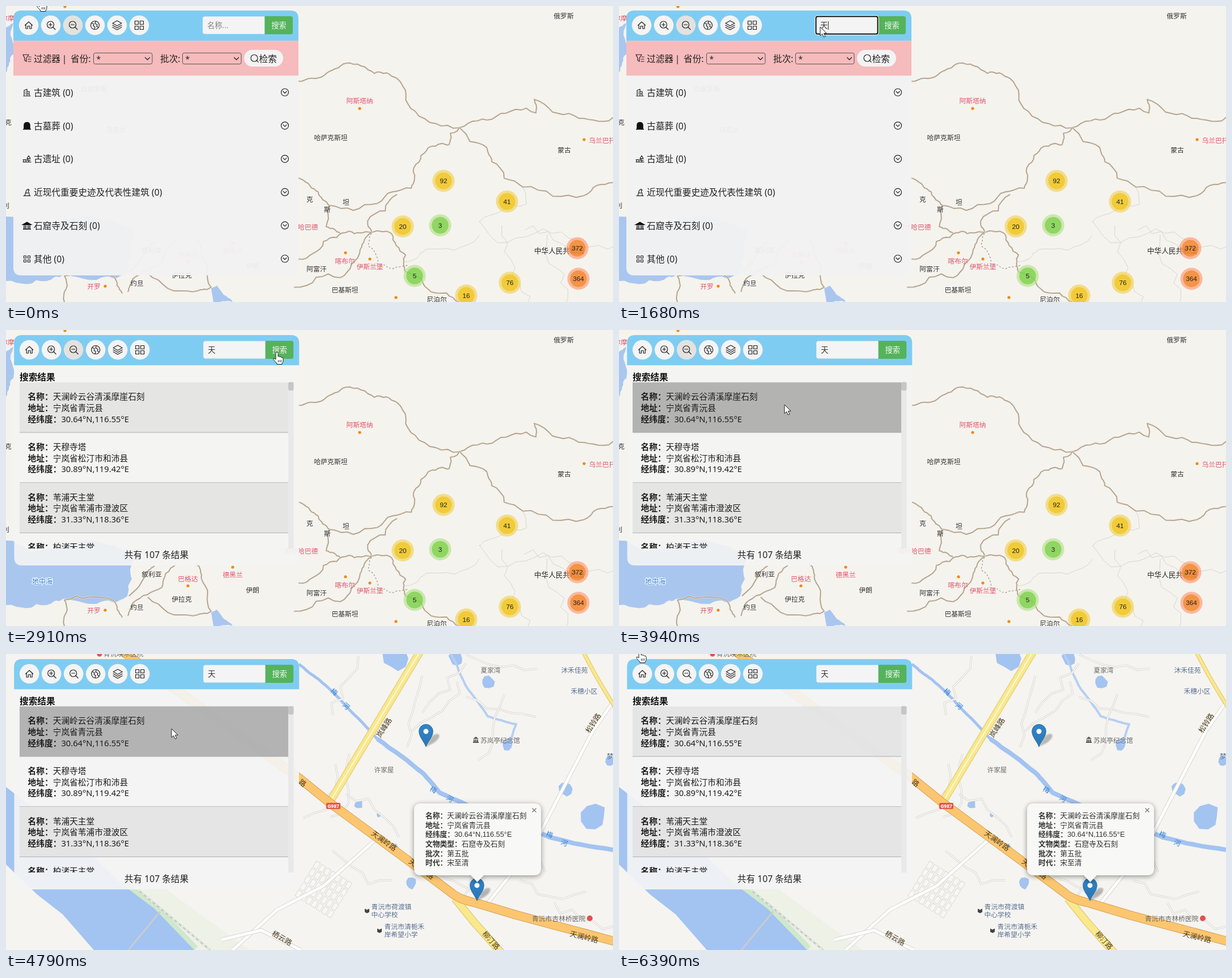
Recreate the animation shown at these times as an HTML page. Size 1071x523 px, loop 6.59 s.

```html
<!DOCTYPE html>
<html lang="zh-CN">
<head>
<meta charset="utf-8">
<title>Map search</title>
<style>
html,body{margin:0;width:100%;height:100%;overflow:hidden;background:#ddd}
svg{display:block;width:1071px;height:523px;font-family:"Noto Sans","Noto Sans CJK SC","Noto Sans CJK JP",sans-serif}
.arial{font-family:"Liberation Sans","Noto Sans CJK SC","Noto Sans CJK JP",sans-serif}
.line{fill:none;stroke:#222;stroke-width:1.2;stroke-linecap:round;stroke-linejoin:round}
.solid{fill:#111;stroke:#111;stroke-width:1.6}
</style>
</head>
<body>
<svg id="stage" viewBox="0 0 1071 523"></svg>
<script>
const LOOP = 6590;
let seed = 7;
const rnd = (a = 0, b = 1) => a + (b - a) * ((seed = seed * 16807 % 2147483647) / 2147483647);
const times = (n, fn) => Array.from({ length: n }, (_, i) => fn(i)).join('');
const each = (list, fn) => list.map(fn).join('');

// Markup helpers
const text = (x, y, s, size, fill = '#222', extra = '') =>
  `<text x="${x}" y="${(+y + size * .36).toFixed(1)}" font-size="${size}" fill="${fill}" ${extra}>${s}</text>`;
const mid = (x, y, s, size, fill, extra = '') => text(x, y, s, size, fill, 'text-anchor="middle" ' + extra);
const bold = 'font-weight="700"';
const turned = (x, y, angle, s, size, fill) =>
  `<g transform="translate(${x} ${y}) rotate(${angle})">${mid(0, 0, s, size, fill)}</g>`;
const rect = (x, y, w, h, fill, r = 0, extra = '') =>
  `<rect x="${x}" y="${y}" width="${w}" height="${h}" rx="${r}" fill="${fill}" ${extra}/>`;
const disc = (x, y, r, fill, extra = '') => `<circle cx="${x}" cy="${y}" r="${r}" fill="${fill}" ${extra}/>`;
const path = (d, fill, extra = '') => `<path d="${d}" fill="${fill}" ${extra}/>`;
const stroke = (d, color, w, extra = '') => path(d, 'none', `stroke="${color}" stroke-width="${w}" stroke-linejoin="round" ${extra}`);
const icon = (x, y, d, kind = 'line') => `<path class="${kind}" transform="translate(${x} ${y})" d="${d}"/>`;
const group = (id, body) => `<g id="${id}">${body}</g>`;
const ring = (r, x = 0, y = 0) => `M${x + r} ${y}a${r} ${r} 0 1 1 ${-2 * r} 0a${r} ${r} 0 1 1 ${2 * r} 0`;
const box = (x, y, s) => `M${x} ${y}h${s}v${s}h${-s}z`;
const tiles = s => each([-s - 1.5, 1.5], x => each([-s - 1.5, 1.5], y => box(x, y, s)));

// Adds small natural wiggles to a coarse outline
function rough(points, amount = .3, depth = 3) {
  let p = points.split(' ').map(q => q.split(',').map(Number));
  for (let k = 0; k < depth; k++) {
    const out = [p[0]];
    for (let i = 1; i < p.length; i++) {
      const [a, b] = p[i - 1], [c, d] = p[i], o = rnd(-.5, .5) * amount;
      out.push([(a + c) / 2 + (d - b) * o, (b + d) / 2 - (c - a) * o], [c, d]);
    }
    p = out;
  }
  return 'M' + p.map(q => q.map(v => v.toFixed(1))).join('L');
}

// A wandering line across a region
function wander(x, y, angle, step, n) {
  let d = `M${x} ${y}`;
  for (let i = 0; i < n; i++) {
    const a = angle + rnd(-.8, .8);
    d += `l${(Math.cos(a) * step).toFixed(1)} ${(Math.sin(a) * step).toFixed(1)}`;
  }
  return d;
}

// An uneven rounded shape
const blob = (x, y, r) => 'M' + Array.from({ length: 9 }, (_, i) => {
  const a = i * Math.PI / 4.5, k = r * rnd(.75, 1.15);
  return [(x + k * Math.cos(a)).toFixed(1), (y + k * Math.sin(a)).toFixed(1)];
}).join('L') + 'Z';

// "x y name|x y name"
const labels = (list, fn) => each(list.split('|'), s => fn(...s.split(' ')));

function worldMap() {
  const water = ['0,372 90,385 225,395 222,440 214,470 160,484 100,475 72,486 0,486', '362,499 372,494 400,523 366,523', '0,38 13,30 13,85 0,118'];
  const borders = [
    '516,133 562,122 600,101 650,119 690,128 722,186 800,215',
    '800,215 865,195 935,189 932,165 1003,194 1071,197',
    '800,215 848,250 857,275 912,320 1020,335 1071,312',
    '800,215 784,225 782,245 750,248 720,285 715,322 655,349 570,352',
    '516,304 540,322 556,338 570,352 565,390 590,402',
    '690,333 638,380 645,400 680,402 705,440 705,470 750,505 800,523',
    '516,447 560,416 605,398 645,400 625,430 590,480 508,497',
    '103,523 103,477 190,478 205,508', '217,470 246,430 262,417',
    '215,505 224,482 275,455 300,412', '250,472 330,505 362,497 345,440 335,412'];
  const border = stroke;
  const cluster = (x, y, n) => {
    const [outer, inner] = n < 10 ? ['#b5e28c', '#6ecc39'] : n < 100 ? ['#f1d357', '#f0c20c'] : ['#fd9c73', '#f18017'];
    return disc(x, y, 19.6, outer, 'opacity=".65"') + disc(x, y, 14.7, inner, 'opacity=".65"') + mid(x, y, n, 11.8, '#222', 'class="arial"');
  };
  return rect(0, 0, 1071, 523, '#f5f3ee') +
    each(water, w => path(rough(w) + 'Z', '#a9c6ef')) +
    times(4, i => stroke(wander(835 + i * 40, 380 + i * 8, i % 2 ? 1.3 : .3, 17, 12), '#d8d5d0', 1)) +
    stroke(rough('835,405 740,430 704,452'), '#d8d5d0', 1) + stroke(rough('912,322 918,350 835,382'), '#d8d5d0', 1) +
    each(borders.map(b => rough(b)), d => stroke(d, '#e6dccb', 3) + stroke(d, '#a09280', 1.2)) +
    stroke(rough('645,402 640,425 655,455 710,458'), '#a09280', 1.2, 'stroke-dasharray="3 3"') +
    labels('984 18 俄罗斯|985 255 蒙古|573 233 哈萨克斯坦|548 465 阿富汗|598 502 巴基斯坦|760 519 尼泊尔|536 342 克|567 360 斯|600 347 坦|257 432 叙利亚|435 460 伊朗|310 476 伊拉克|231 490 约旦|4 206 克|0 353 利|155 147 白俄罗斯|194 219 乌克兰',
      (x, y, s) => mid(x, y, s, 11.8, '#333')) + text(932, 432, '中华人民共和国', 12.6) +
    labels('624 168 阿斯塔纳|598 451 喀布尔|642 461 伊斯兰堡|1052 238 乌兰巴托|521 391 阿什哈巴德|155 496 开罗|400 433 德黑兰|321 440 巴格达|3 22 尔摩',
      (x, y, s) => mid(x, y, s, 11.8, '#e0566c')) +
    labels('624 181|599 436|642 447|1020 236|175 495|688 515|104 1|400 419|321 452', (x, y) => disc(x, y, 2.6, '#ef8a0c')) +
    mid(64, 445, '地中海', 12, '#2479cf', 'stroke="#fff" stroke-width="2" paint-order="stroke"') +
    labels('772 309 92|884 345.5 41|700 389.5 20|766 387.5 3|721 477 5|889 489 76|812 511.5 16|1008 428 372|1010 482 364', cluster);
}

const road = (d, w, fill, edge) => stroke(d, edge, w) + stroke(d, fill, w - 2);
const pin = (x, y) => `<g transform="translate(${x} ${y})">` +
  path('M0 0L9-16Q15-25 23-22Q26-16 14-7Z', '#555', 'opacity=".38" filter="url(#soft)"') +
  path('M0 0C-3-9-12.3-17-12.3-27.5A12.3 12.3 0 0 1 12.3-27.5C12.3-17 3-9 0 0Z', 'url(#pinFill)', 'stroke="#2a6ea6" stroke-width="1"') +
  disc(0, -27.3, 4.5, '#fff') + '</g>';

function townMap() {
  const blue = '#a3c3f1', grey = '#6a6a6a', slate = '#5b6f93', ink = '#4a3a1c';
  const lane = (d, w = 7) => road(d, w, '#fff', '#d9d6d1');
  const yellow = (d, w) => road(d, w, '#f9e88c', '#e2c468');
  const school = (x, y) => path(`M${x - 4} ${y - 3}l4 2 4-2v6l-4 2-4-2z`, '#444');
  const bank = 'M205 407L262 450L316 506L332 523';
  const main = 'M205-5L517 219L570 262L722 374L786 422Q800 434 830 440L900 461L1075 508';
  const side = 'M731-5L571 262';
  return rect(0, 0, 1071, 523, '#f5f4f0') +
    path(bank + 'H430L260 400Z', '#edf1e6') + stroke(bank, '#cfe8cb', 18) +
    path('M0 235L130 335L205 407L262 450L316 506L332 523H155L100 460L55 425L0 372Z', blue) +
    stroke('M232 416L285 460L360 523', '#c6c8c6', 3) + stroke('M232 416L285 460L360 523', '#fff', 1.4, 'stroke-dasharray="5 5"') +
    stroke('M272 455L216 523', '#c9cbd0', 3) +
    labels('688 8 22|794 8 13|850 49 12|987 238 13|1036 288 24|1066 188 9|622 266 8|686 346 10|715 405 10|885 160 11|658 284 4', (x, y, r) => path(blob(+x, +y, +r), blue)) +
    stroke(rough('785,0 815,62 850,110 900,124 888,160', .08), '#b5cff3', 4) +
    stroke(rough('517,18 552,45 600,92 655,150', .05), blue, 5) +
    stroke(rough('655,150 735,210 765,245 860,290 960,324 1071,346', .05), blue, 8) +
    times(16, i => lane(wander(rnd(520, 1040), rnd(0, 480), i % 2 ? .4 : 2.1, 22, 6), 3.4)) +
    `<g transform="translate(548 366) rotate(32)">` +
    times(35, i => rect(i % 7 * 11, Math.floor(i / 7) * 15, 8, 12, '#f8f7f4', 0, 'stroke="#dcdad5"')) + '</g>' +
    lane('M400 523L478 452L560 410L650 330') + lane('M380 505L450 488L520 523') + lane('M1071 85L1036 135L930 340L850 440') +
    yellow(side, 14) + stroke(side, '#fdf8dc', 2) + yellow('M1018-5Q1040 40 1075 95', 7) +
    yellow('M792 432L826 474L874 528', 14) + road(main, 16, '#fbc66f', '#d6a05c') +
    rect(565, 263, 25, 11, '#e1574c', 2) + mid(577.5, 268.6, 'G987', 8.5, '#fff', bold) +
    labels('855 29 夏家湾|667 205 许家屋|872 153 苏岚亭纪念馆', (x, y, s) => mid(x, y, s, 11.6, grey)) +
    labels('1003 29 沐禾佳苑|1020 66 禾穗小区|1066 181 梦|680 447 青沅市荷渡镇|668 460.5 中心学校|703 482 青沅市清栀禾|697 495.5 岸希望小学', (x, y, s) => mid(x, y, s, 11.8, slate)) +
    path('M824 150l5-4 5 4zM824 155h10v2h-10z' + times(3, i => `M${825 + i * 3} 151h2v4h-2z`), '#555') +
    labels('579 67 40 梅|600 92 40 河|754 240 30 梅|783 256 30 河|959 319 20 梅|985 334 20 河', (x, y, a, s) => turned(x, y, a, s, 12, '#2f7fd3')) +
    labels('667 130 -57 岚峰路|1036 122 -57 松铃路|523 228 38 路|667 330 36 天澜岭路|733 380 36 天澜岭路|1020 500 14 天澜岭路|856 506 48 柳汀路|487 502 30 栖云路', (x, y, a, s) => turned(x, y, a, s, 12.8, ink)) +
    school(637, 453) + school(659, 488) +
    text(928, 467.5, '青沅市杏林桥医院', 11.8, grey) + disc(1030, 467, 5, '#e2504f') +
    text(172, 0, '青沅映禾医院', 11.8, grey) + disc(165, 0, 4.5, '#e2504f') + pin(741, 164) + pin(831, 436);
}

const keys = ['名称', '地址', '经纬度', '文物类型', '批次', '时代'];
const places = [
  ['天澜岭云谷清溪摩崖石刻', '宁岚省青沅县', '30.64°N,116.55°E'],
  ['天穆寺塔', '宁岚省松汀市和沛县', '30.89°N,119.42°E'],
  ['苇浦天主堂', '宁岚省苇浦市澄波区', '31.33°N,118.36°E'],
  ['柏渚天主堂']];
const pair = (x, y, k, v, size, fill) => text(x, y, `<tspan ${bold}>${k}：</tspan>${v}`, size, fill);

function popup() {
  const values = [...places[0], '石窟寺及石刻', '第五批', '宋至清'];
  const shape = 'M732 264H932Q944 264 944 276V379Q944 391 932 391H843L831.5 403L820 391H732Q720 391 720 379V276Q720 264 732 264Z';
  return path(shape, '#000', 'opacity=".42" filter="url(#blur)" transform="translate(0 2)"') + path(shape, '#f8f8f6') +
    '<g class="arial">' + each(values, (v, i) => pair(740, 285.5 + i * 16.6, keys[i], v, 12.75, '#333')) + '</g>' +
    stroke('M928.5 272.5l7 7m0-7l-7 7', '#757575', 1.3);
}

function toolbar() {
  const lens = ring(6, -.5, -1) + 'M4 3.5L8 7.5M-3.5-1H2.5';
  const glyphs = ['M-6.5 0L0-6L6.5 0M-5-1.5V6H-1.8V1.5H1.8V6H5V-1.5', lens + 'M-.5-4V2', lens,
    ring(7.5) + 'M-6-4L-2-2L-3 1L0 3L-1 7M1-7L0-3L4-1L3 2L6 4', 'M0-8L8-3.5L0 1L-8-3.5ZM-8 0L0 4.5L8 0M-8 3.5L0 8L8 3.5', tiles(6)];
  return path('M13 61.2V22Q13 8 27 8H502Q516 8 516 22V61.2Z', '#7fccf3') +
    each(glyphs, (g, i) => disc(40 + i * 39, 34, 17.3, '', 'class="btn"') + icon(40 + i * 39, 34, g)) +
    path('M351 18.5H456.5V49.5H351Q347 49.5 347 45.5V22.5Q347 18.5 351 18.5Z', '', 'class="btn"') +
    path('M456.5 18H502Q506 18 506 22V46Q506 50 502 50H456.5Z', '#55b35b') + mid(481.5, 34, '搜索', 13.3, '#f4f9f4') +
    group('focus', rect(346, 17, 112, 34, 'none', 5, 'stroke="#fff" stroke-width="1.5"') + rect(347.5, 18.5, 109, 31, 'none', 3, 'stroke="#111" stroke-width="2"')) +
    '<text id="query" x="355" y="38.8" font-size="13.3"></text>' + group('caret', rect(0, 27, 1, 15, '#222'));
}

function filters() {
  const names = ['古建筑', '古墓葬', '古遗址', '近现代重要史迹及代表性建筑', '石窟寺及石刻', '其他'];
  const glyphs = ['M-5 6V-4L0-6V6M0-2H4V6M-6 6H6M-3-1H-2M-3 2H-2M2 1V3', 'M-5 6V-1Q-5-6 0-6Q5-6 5-1V6ZM-7 6H7',
    'M-7 5H7M-7 1H-1M-6 1V5M-2 1V5M3-6L0-1H6ZM3-1L0 2H6M3 2V5', 'M-6 6H6M-4 6L-1-4L2-6L4-4L2-3L4 2V6M-2 1H2',
    'M-7-2L0-6L7-2ZM-5-1V5M-2-1V5M2-1V5M5-1V5M-7 6H7', tiles(4)];
  const select = x => rect(x, 83, 103.5, 19.5, 'none', 3, 'stroke="#555"') + text(x + 5, 94, '*', 14) + icon(x + 95, 93, 'M-4-2L0 2L4-2');
  return path('M13 61.2H516V462Q516 476 502 476H27Q13 476 13 462Z', '#f3f3f3', 'opacity=".95"') + rect(13, 61.2, 503, 61.8, '#f6bbbc') +
    icon(37, 92, 'M-7-6H3L-1 0V6L-4 4V0ZM3-2H7M2 2H7M2 6H7') + text(49, 93, '过滤器', 15.7) + mid(103, 93, '|', 15.7) +
    text(114, 93, '省份:', 15.7) + select(154.5) + text(272, 93, '批次:', 15.7) + select(311.5) +
    rect(420, 77.5, 69, 29.5, '#f3f3f3', 14.7) + icon(438, 92, ring(6) + 'M4 4L7 7') + text(446.5, 93, '检索', 15.7) +
    each(names, (n, i) => {
      const y = 153 + i * 58.8;
      return icon(37, y, glyphs[i], i % 3 === 1 ? 'solid' : 'line') + text(49, y, n + ' (0)', 15.7) +
        icon(492, y - .5, ring(6.5) + 'M-3-1.5L0 1.5L3-1.5');
    });
}

function results() {
  return path('M14.5 62H517V402Q517 416 503 416H28.5Q14.5 416 14.5 402Z', '#f5f5f5', 'opacity=".91"') +
    text(24, 83, '搜索结果', 15.7, '#111', bold) +
    '<g clip-path="url(#list)">' + each(places, (r, i) => {
      const y = 92.5 + i * 88.7;
      return (i % 2 ? '' : rect(24, y, 474, 88.7, '#e4e4e4', 0, `opacity=".96" class="row${i}"`)) + rect(24, y + 88, 474, 1, '#adadad') +
        each(r, (v, j) => pair(38.5, y + 25.5 + j * 19.6, keys[j], v, 14.73, '#1c1c1c'));
    }) + rect(498, 92, 9.5, 294, '#e9e9e9') + rect(498, 92, 9.5, 15, '#c6c6c6', 3) + '</g>' +
    mid(265.5, 397.5, '共有 107 条结果', 15.7);
}

const stage = document.getElementById('stage');
stage.innerHTML = `<defs>
<filter id="blur" x="-20%" y="-20%" width="140%" height="140%"><feGaussianBlur stdDeviation="5"/></filter>
<filter id="soft" x="-30%" y="-30%" width="160%" height="160%"><feGaussianBlur stdDeviation="1.3"/></filter>
<linearGradient id="pinFill" x2="0" y2="1"><stop stop-color="#3284c8"/><stop offset="1" stop-color="#2b76b5"/></linearGradient>
<clipPath id="list"><rect x="24" y="92" width="484" height="294"/></clipPath></defs>` +
  rect(0, 0, 1071, 523, '#ddd') + group('world', worldMap()) + group('town', townMap()) + group('popup', popup()) +
  group('filters', filters()) + group('results', results()) + group('toolbar', toolbar()) +
  group('arrow', path('M0 0V15.5L3.7 12.2L6.3 18L9 16.8L6.4 11.2H11.3Z', '#fff', 'stroke="#222"')) +
  group('hand', path('M-2 2Q-2 0 0 0T2 2V8Q4 6.5 5 8.5Q7 7 8 9.5Q11 8.5 11 11.5V15Q11 18 9 20V21.5H0V20L-6 13.5Q-7 10.5-4 11.5L-2 13Z', '#fff', 'stroke="#222"') +
    stroke('M2.5 14v4M5 14v4M7.5 14v4', '#222', .9));

const el = {};
stage.querySelectorAll('g[id],#query').forEach(n => el[n.id] = n);
const buttons = stage.querySelectorAll('.btn'), firstRow = stage.querySelector('.row0');
const show = (n, on) => n.style.display = on ? '' : 'none';

// Pointer trips: start, end, hops, destination x and y
const trips = [[110, 490, 3, 355, 37], [2210, 2560, 3, 478, 39], [3080, 3250, 2, 350, 122], [3440, 3940, 4, 292, 132], [5390, 6390, 6, 37, -6]];

function pointer(t) {
  let x = 61, y = -12;
  for (const [from, to, hops, tx, ty] of trips) {
    if (t < from) break;
    const k = Math.min(1, (Math.floor((t - from) / (to - from) * (hops - 1)) + 1) / hops);
    x += (tx - x) * k;
    y += (ty - y) * k;
  }
  return [x, y];
}

function typed(t) {
  if (t < 1000) return '名称...';
  return t < 1680 ? 'tian'.slice(0, Math.floor((t - 1000) / 170)) : '天';
}

function draw(t) {
  const found = t >= 2730, blank = t >= 4450 && t < 4650;
  const [x, y] = pointer(t);
  show(el.world, t < 4450);
  show(el.town, t >= 4650);
  el.town.setAttribute('opacity', t < 4790 ? .6 : 1);
  show(el.popup, t >= 4450);
  el.popup.setAttribute('opacity', blank ? .04 : 1);
  show(el.filters, !found);
  show(el.results, found);
  el.toolbar.setAttribute('transform', found ? 'translate(1.2 1)' : '');
  buttons.forEach((b, i) => b.setAttribute('fill', blank ? '#fcfcfc' : i === 2 && t < 4450 ? '#e3e2df' : '#f4f4f4'));
  firstRow.setAttribute('fill', x < 498 && y >= 92 && y < 181 ? '#b0b0b0' : '#e4e4e4');

  const focused = t >= 1000 && t < 2560;
  el.query.textContent = typed(t);
  el.query.setAttribute('fill', t < 1000 ? '#858585' : '#333');
  show(el.focus, focused);
  show(el.caret, focused);
  if (focused) el.caret.setAttribute('transform', `translate(${355.5 + el.query.getComputedTextLength()} 0)`);

  const clickable = y < 60 && (x < 260 || x > 457);
  show(el.hand, clickable);
  show(el.arrow, !clickable);
  el[clickable ? 'hand' : 'arrow'].setAttribute('transform', `translate(${x} ${y})`);
}

const start = performance.now();
function tick() {
  draw((performance.now() - start) % LOOP);
  requestAnimationFrame(tick);
}
tick();
</script>
</body>
</html>
```
